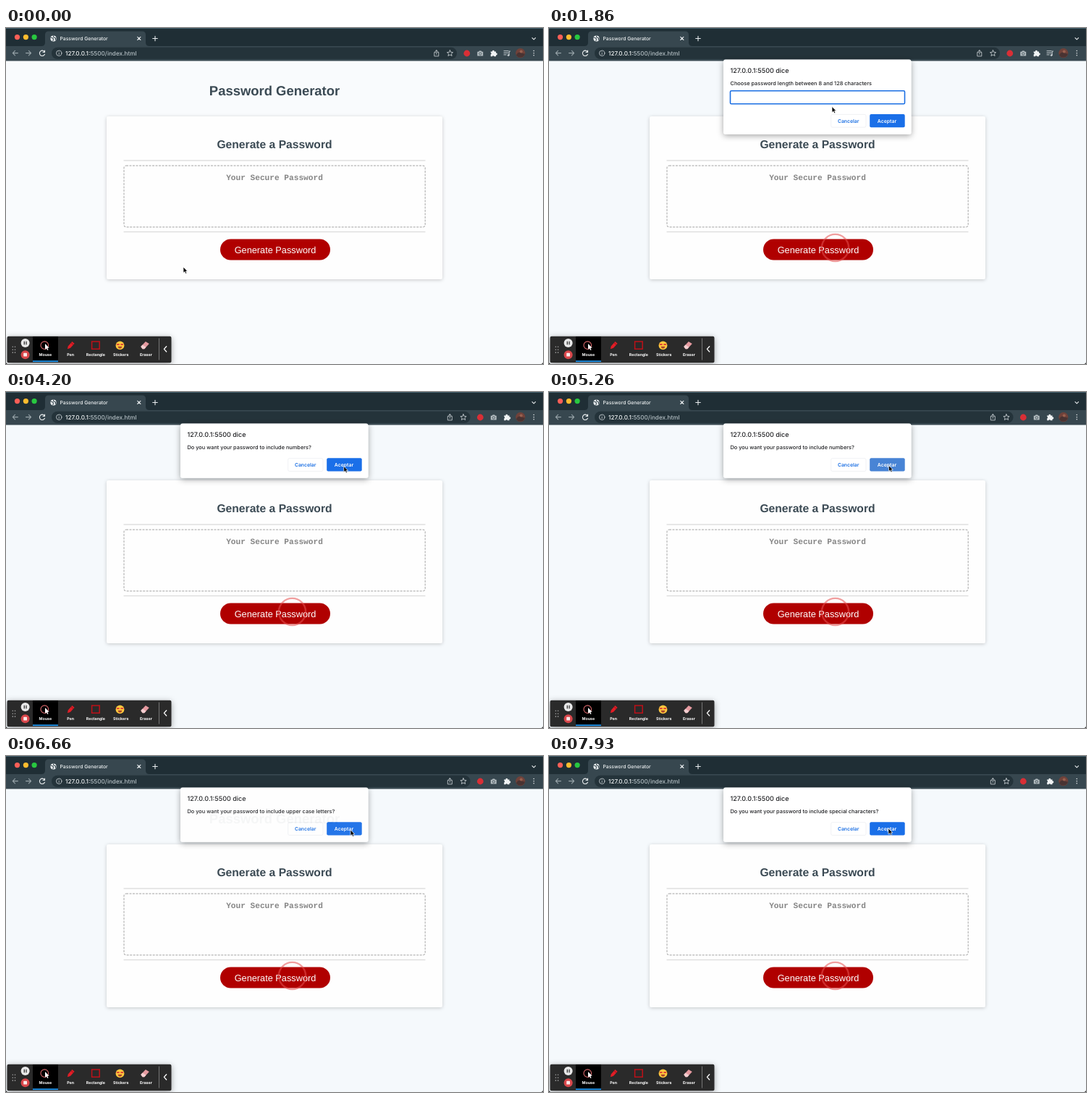
An HTML page that plays this animation: 742 by 464 pixels, repeating every 8 s.

```html
<!DOCTYPE html>
<html lang="en">
<head>
<meta charset="utf-8">
<title>Password Generator</title>
<style>
html, body { margin: 0; width: 100%; height: 100%; overflow: hidden; background: #f6f9fc; }
svg { display: block; width: 742px; height: 464px; }
text { font-family: Inter, "Noto Sans", sans-serif; text-rendering: geometricPrecision; }
.page text { font-family: "Liberation Sans", Arial, sans-serif; text-anchor: middle; }
.page .mono { font-family: "Liberation Mono", "Courier New", monospace; }
.mid { text-anchor: middle; }
.line { fill: none; stroke-linecap: round; stroke-linejoin: round; }
</style>
</head>
<body>
<svg viewBox="0 0 742 464" xmlns="http://www.w3.org/2000/svg">
  <defs>
    <filter id="soft" x="-10%" y="-15%" width="120%" height="135%">
      <feDropShadow dx="0" dy="1" stdDeviation="2.4" flood-opacity=".2"/>
    </filter>
    <filter id="deep" x="-10%" y="-20%" width="120%" height="150%">
      <feDropShadow dx="0" dy="2" stdDeviation="4" flood-opacity=".36"/>
    </filter>
  </defs>

  <rect id="back" width="742" height="464"/>

  <g class="page">
    <text x="371" y="93" font-size="18.45" font-weight="700" fill="#3b4a54">Password Generator</text>
    <rect x="139" y="122" width="464" height="225" rx="3" fill="#fefefe" filter="url(#soft)"/>
    <text x="371" y="166" font-size="15.65" font-weight="700" fill="#3b4a54">Generate a Password</text>
    <path d="M162.5 183H579.5M162.5 281.5H579.5" stroke="#dfdfdf" stroke-width="1.3"/>
    <rect x="163" y="190.2" width="416.2" height="84.6" rx="3" fill="none" stroke="#b6b6b6" stroke-width="1.2" stroke-dasharray="3 1.5"/>
    <text class="mono" x="371" y="209.5" font-size="11.15" font-weight="700" fill="#858585">Your Secure Password</text>
    <rect x="296" y="291.5" width="152" height="29" rx="14.5" fill="#b00000"/>
    <text x="372" y="310.5" font-size="12.75" fill="#fff">Generate Password</text>
  </g>

  <circle id="ring" cx="395.5" cy="303.5" r="18.6" fill="none" stroke="#e65050" stroke-opacity=".55" stroke-width="2.4"/>

  <g id="chrome">
    <rect width="742" height="26" fill="#1f2e35"/>
    <rect width="742" height="1" fill="#45616e"/>
    <circle cx="15.5" cy="12.6" r="3.6" fill="#fe5f57"/>
    <circle cx="27.4" cy="12.6" r="3.6" fill="#febc2e"/>
    <circle cx="39.1" cy="12.6" r="3.6" fill="#28c840"/>
    <path d="M49 25q5 0 5-5V9.5q0-5 5-5H188q5 0 5 5V20q0 5 5 5H742V45.5H0V25Z" fill="#37474f"/>
    <circle cx="65.5" cy="14.6" r="4.1" fill="#edf1f3"/>
    <path d="M62 13.2l2.3.6 1.2 1.6-.6 2.5M65.5 11l.5 2 2.7 1.1-.5 2.3" class="line" stroke="#37474f" stroke-width="1.1"/>
    <text x="74.5" y="17" font-size="6.8" font-weight="500" fill="#f1f4f5">Password Generator</text>
    <g class="line" stroke="#e8ecee" stroke-width="1.1">
      <path d="M181.7 12.3l4.2 4.2M185.9 12.3l-4.2 4.2M202.7 14.5h6.6M206 11.2v6.6"/>
      <path d="M727 13.6l2.3 2.3 2.3-2.3"/>
      <path d="M53.1 32.7A3.7 3.7 0 1 0 53.5 36.3M53.5 31v2.5h-2.5"/>
      <path d="M16.4 34.6H9.4M12.5 31.4l-3.2 3.2 3.2 3.2M27.5 34.6h7M31.4 31.4l3.2 3.2-3.2 3.2" stroke="#98a4a9"/>
    </g>
    <rect id="bar" x="63" y="26.7" height="16.4" rx="8.2" fill="#24333a"/>
    <g class="line" stroke="#d3dade" stroke-width=".8">
      <circle cx="73.2" cy="34.8" r="3.7"/>
      <path d="M73.2 34.6v2M73.2 32.9v.1"/>
    </g>
    <text x="82" y="37.7" font-size="8.2" font-weight="500" fill="#f1f4f5">127.0.0.1:<tspan fill="#b3bec3">5500/index.html</tspan></text>
    <g id="icons">
      <g class="line" stroke="#d3dade" stroke-width=".8">
        <path d="M593.3 33.5h-1.5v5.4h6v-5.4h-1.5M594.8 36.3v-5.6M593 32.4l1.8-1.8 1.8 1.8"/>
        <path d="M613.5 30.7l1.2 2.7 2.9.3-2.2 1.9.7 2.9-2.6-1.5-2.6 1.5.7-2.9-2.2-1.9 2.9-.3Z"/>
      </g>
      <circle cx="636.8" cy="35" r="4.4" fill="#d92f36"/>
      <path d="M651.3 32.7h1.8l.9-1.2h2.6l.9 1.2h1.7v5.8H651.300Z" fill="#b4bdc1"/>
      <circle cx="655.3" cy="35.5" r="1.7" fill="#b4bdc1" stroke="#37474f" stroke-width=".8"/>
      <path d="M669.7 32.5h2.3a1.4 1.4 0 1 1 2.7 0h2.3v2.2a1.4 1.4 0 1 1 0 2.7v1.8h-2.6a1.3 1.3 0 0 0-2.5 0h-2.2v-2.6a1.3 1.3 0 0 0 0-2.5Z" fill="#f1f4f5"/>
    </g>
    <g id="media" class="line" stroke="#c6ced2" stroke-width="1">
      <path d="M688 31.7h6.2M688 34.3h6.2M688 36.9h3.2M695.2 37.3v-5.2h1.4"/>
      <circle cx="694.2" cy="37.6" r="1" fill="#c6ced2"/>
    </g>
    <circle cx="710.8" cy="34.6" r="6.6" fill="#70423a"/>
    <path d="M705 37.5q2-5 6-3.5t6 1.5a6.6 6.6 0 0 1-12 2Z" fill="#493332"/>
    <circle cx="711.8" cy="32.6" r="2" fill="#98604f"/>
    <path d="M729.3 31.6v.01M729.3 34.7v.01M729.3 37.8v.01" class="line" stroke="#f1f4f5" stroke-width="1.5"/>
  </g>

  <g id="dialog">
    <rect id="panel" x="241" y="43.5" width="259.5" rx="3" fill="#fff" filter="url(#deep)"/>
    <text x="250.5" y="62" font-size="9" font-weight="500" fill="#202124">127.0.0.1:5500 dice</text>
    <text id="ask" x="250.5" y="79" font-size="7.36" font-weight="500" fill="#202124"></text>
    <g id="field">
      <rect x="250.5" y="86.7" width="241" height="18" rx="1.5" fill="#fff" stroke="#1b6fe3" stroke-width="1.6"/>
      <text id="typed" x="255" y="98.4" font-size="7.2" font-weight="500" fill="#202124"></text>
    </g>
    <g id="buttons">
      <rect x="389.7" y="91.7" width="48.3" height="17.7" rx="2" fill="#fff" stroke="#eceef1" stroke-width=".8"/>
      <rect id="ok" x="443.2" y="91.3" width="48.5" height="18.3" rx="2"/>
      <g class="mid" font-size="6.85" font-weight="600">
        <text x="413.7" y="102.9" fill="#1b6fe3">Cancelar</text>
        <text x="467" y="102.9" fill="#fff">Aceptar</text>
      </g>
    </g>
  </g>

  <g id="tools">
    <rect x="1.5" y="425.7" width="227" height="36.5" rx="2" fill="#2c2c2c" filter="url(#deep)"/>
    <rect x="37" y="426" width="35" height="34" fill="#000"/>
    <rect x="37" y="459.3" width="35" height="1.8" fill="#1e96f0"/>
    <path d="M9.3 440.3v8M12.5 440.3v8" class="line" stroke="#aaa" stroke-width="1.5" stroke-dasharray=".01 3.9"/>
    <circle cx="26.6" cy="435" r="6" fill="#e9e9e9"/>
    <path d="M25.3 432.7v4.6M28 432.7v4.6" stroke="#333" stroke-width="1.3"/>
    <circle cx="26.6" cy="451.2" r="6" fill="#d9474b"/>
    <rect x="24.2" y="448.8" width="4.8" height="4.8" rx=".6" fill="#fbeaea"/>
    <circle cx="53.3" cy="438.2" r="5.3" fill="none" stroke="#d9676b" stroke-width="1.1"/>
    <path d="M54 436v8l1.9-1.7 1.3 2.8 1.3-.6-1.3-2.7h2.5Z" fill="#fff"/>
    <path d="M84.8 443.2l1.1-3.9 5.5-6.3 3.2 2.7-5.7 6.2Z" fill="#e21d26"/>
    <path d="M90 434.7l3.1 2.7" stroke="#791317" stroke-width=".8"/>
    <rect x="118.6" y="433" width="10.6" height="10.3" fill="none" stroke="#bd1119" stroke-width="1.5"/>
    <circle cx="157.5" cy="438.4" r="5.9" fill="#ffc83d"/>
    <path d="M153.8 436.9h2M159.2 436.9h2" class="line" stroke="#dd4436" stroke-width="2"/>
    <path d="M154.6 439.8h5.8q-.5 2.9-2.9 2.9t-2.9-2.9Z" fill="#a8452c"/>
    <path d="M186.3 439.9l6.6-7 4.900 3-6.600 7.300h-2.600Z" fill="#e69aa0"/>
    <path d="M186.3 439.9l2.300-2.400 4.900 3.200-2.300 2.500h-2.600Z" fill="#f3cfd1"/>
    <path d="M211.5 428.5v30" stroke="#8b8b8b" stroke-width=".8"/>
    <path d="M221.7 439.8l-3.3 3.6 3.3 3.6" class="line" stroke="#fff" stroke-width="1.3"/>
    <g id="labels" class="mid" font-size="5.35" font-weight="700" fill="#fff"></g>
  </g>

  <path d="M742 461v3h-3q3 0 3-3ZM0 461v3h3q-3 0-3-3Z" fill="#111"/>
  <path id="cursor" d="M0 0V8.2L1.9 6.5 3.2 9.3 4.7 8.6 3.4 5.9H5.9Z" fill="#000" stroke="#fff" stroke-width=".7" stroke-linejoin="round"/>
</svg>

<script>
const $ = id => document.getElementById(id);
const LOOP = 8000;
const include = what => `Do you want your password to include ${what}?`;

const dialogs = [
  { from: 1400, to: 3420, ask: 'Choose password length between 8 and 128 characters', prompt: true },
  { from: 3570, to: 5330, ask: include('numbers') },
  { from: 5480, to: 6430, ask: include('lower case letters') },
  { from: 6570, to: 7240, ask: include('upper case letters') },
  { from: 7390, to: 9000, ask: include('special characters') }
];

// Cursor stops: time, x, y
const path = [
  [0, 245, 330], [250, 245, 330], [1000, 394, 302], [1400, 395, 302],
  [1860, 391, 108.5], [2100, 391, 112], [2600, 391, 112], [3200, 458, 123],
  [3480, 458.5, 123], [4000, 466.5, 102.5], [4400, 467, 102.5], [5000, 469.5, 101.5],
  [5500, 469.5, 101.5], [6200, 475, 102], [6660, 476, 102], [7100, 476, 102],
  [7700, 469, 100], [LOOP, 469, 100]
];
const presses = [[3320, 3420], [5220, 5330], [6330, 6430], [7140, 7240]];

const clamp = v => Math.max(0, Math.min(1, v));
const ease = v => v * v * (3 - 2 * v);
const within = (t, [a, b]) => t >= a && t < b;

function cursorAt(t) {
  const i = path.findIndex(p => p[0] > t);
  const [a, b] = [path[i - 1], path[i]];
  const k = ease((t - a[0]) / (b[0] - a[0]));
  return [a[1] + (b[1] - a[1]) * k, a[2] + (b[2] - a[2]) * k];
}

function drawDialog(t) {
  const d = dialogs.find(d => t >= d.from && t < d.to + 100);
  $('dialog').setAttribute('visibility', d ? 'visible' : 'hidden');
  if (!d) return;
  const shown = ease(clamp((t - d.from) / 105)) * (1 - ease(clamp((t - d.to) / 100)));
  $('dialog').setAttribute('opacity', shown);
  $('panel').setAttribute('height', d.prompt ? 103.3 : 75.3);
  $('ask').textContent = d.ask;
  $('field').setAttribute('display', d.prompt ? 'inline' : 'none');
  $('typed').textContent = '50'.slice(0, t < 2250 ? 0 : t < 2450 ? 1 : 2);
  $('buttons').setAttribute('transform', `translate(0 ${d.prompt ? 27.7 : 0})`);
  $('ok').setAttribute('fill', presses.some(p => within(t, p)) ? '#4884d5' : '#1a6fe8');
}

function draw(t) {
  const moved = t >= 2200;
  $('back').setAttribute('fill', t < 1300 ? '#f9fbfd' : '#f5f9fc');
  $('ring').setAttribute('visibility', t < 1280 ? 'hidden' : 'visible');
  $('icons').setAttribute('transform', `translate(${moved ? 18.5 : 0} 0)`);
  $('bar').setAttribute('width', moved ? 578.5 : 560);
  $('media').setAttribute('visibility', moved ? 'hidden' : 'visible');
  drawDialog(t);
  $('cursor').setAttribute('transform', `translate(${cursorAt(t)})`);
}

['Mouse', 'Pen', 'Rectangle', 'Stickers', 'Eraser'].forEach((name, i) => {
  const label = document.createElementNS('http://www.w3.org/2000/svg', 'text');
  label.setAttribute('x', 54.3 + i * 34.8);
  label.setAttribute('y', 453);
  label.textContent = name;
  $('labels').append(label);
});

const start = performance.now();
function tick() {
  draw((performance.now() - start) % LOOP);
  requestAnimationFrame(tick);
}
tick();
</script>
</body>
</html>
```
